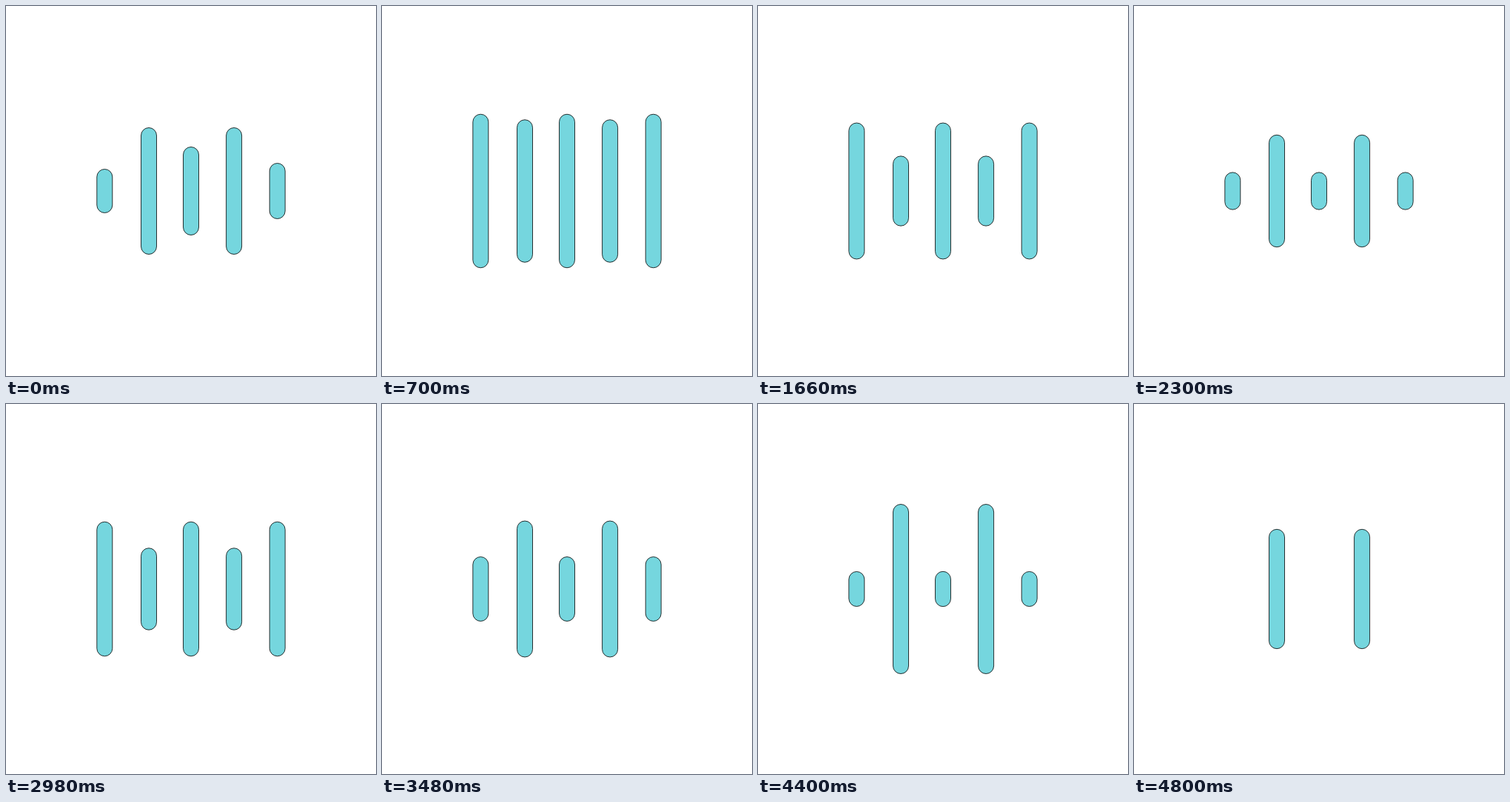
An HTML page for the animation above (4820 ms loop, 500 px wide and 500 px high).

```html
<!DOCTYPE html>
<html lang="en">
<head>
<meta charset="utf-8">
<title>Sound bars</title>
<style>
  @property --h {
    syntax: "<length>";
    inherits: false;
    initial-value: 0px;
  }

  html, body {
    margin: 0;
    width: 100%;
    height: 100%;
    overflow: hidden;
    background: #fff;
  }

  svg {
    display: block;
    width: 100vw;
    height: 100vh;
  }

  rect {
    width: 21px;
    height: calc(var(--h) - 1px);
    y: calc(250.5px - var(--h) / 2);
    rx: 10.5px;
    ry: 10.5px;
    fill: #75d6de;
    stroke: #000;
    stroke-width: .8px;
  }

  /* The timing curve approximates a sine between each low and high. */
  .outer {
    animation:
      outer 4820ms cubic-bezier(.37, 0, .63, 1) infinite,
      cut 4820ms step-end infinite;
  }

  .inner {
    animation: inner 4820ms cubic-bezier(.37, 0, .63, 1) infinite;
  }

  @keyframes outer {
    0%, 100% { --h: var(--start); }
    12.033%  { --h: 230px; }
    23.444%  { --h: 40px; }
    38.693%  { --h: 216px; }
    46.68%   { --h: 48px; }
    58.506%  { --h: 218px; }
    69.502%  { --h: 48px; }
    78.216%  { --h: 230px; }
    90.871%  { --h: 48px; }
  }

  @keyframes inner {
    0%      { --h: 172px; }
    6.639%  { --h: 110px; }
    17.22%  { --h: 208px; }
    35.062% { --h: 95px; }
    46.473% { --h: 154px; }
    58.714% { --h: 93px; }
    70.124% { --h: 200px; }
    79.668% { --h: 66px; }
    91.286% { --h: 230px; }
    100%    { --h: 162px; }
  }

  /* The outer bars blink out just before the loop restarts. */
  @keyframes cut {
    0%           { opacity: 1; }
    99.55%, 100% { opacity: 0; }
  }
</style>
</head>
<body>
<svg viewBox="0 0 500 500">
  <rect class="outer" x="122.8" style="--start: 60px"/>
  <rect class="inner" x="182.5"/>
  <rect class="outer" x="239.5" style="--start: 120px"/>
  <rect class="inner" x="297.6"/>
  <rect class="outer" x="356.2" style="--start: 76px"/>
</svg>
</body>
</html>
```
